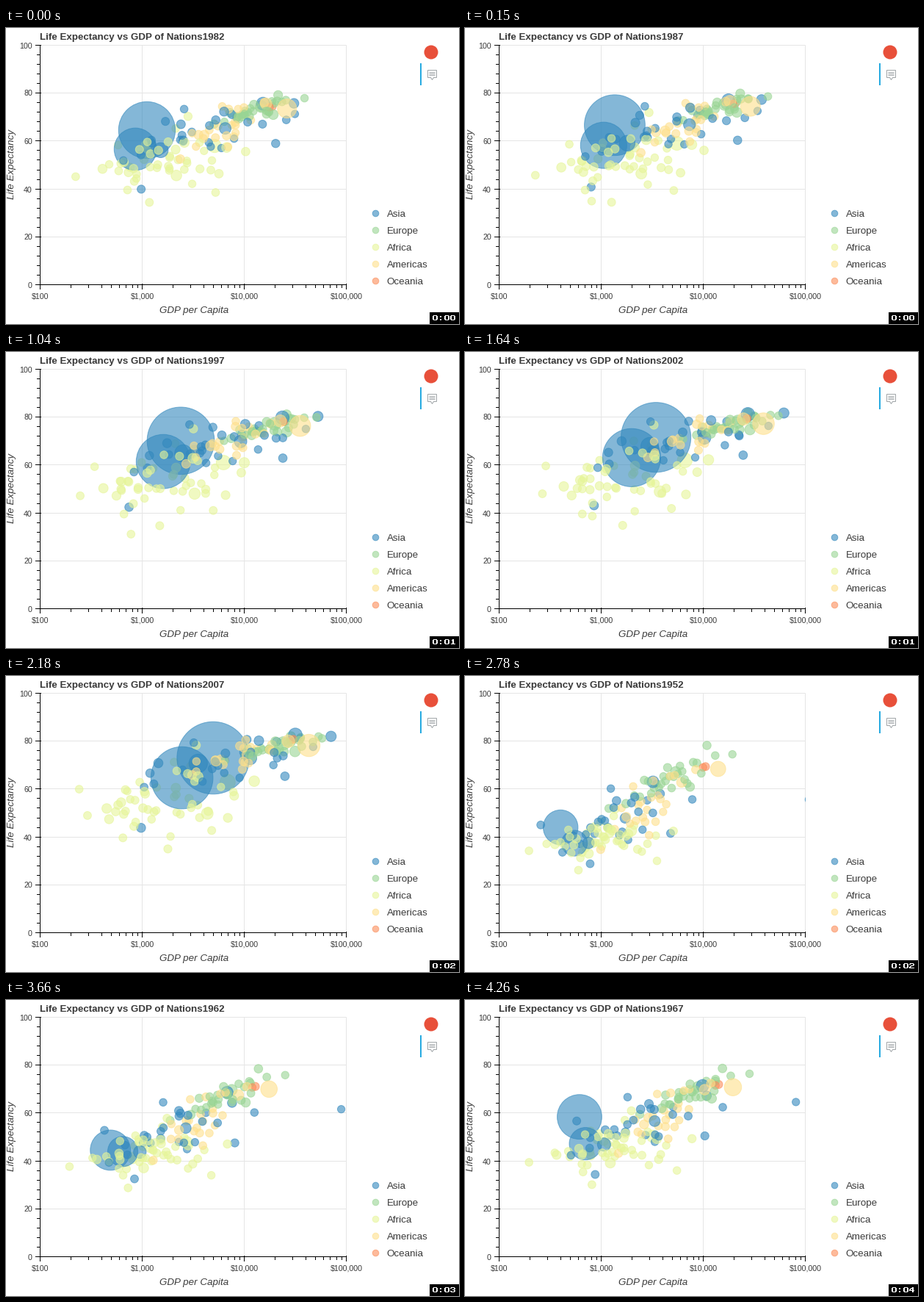
A matplotlib script that plays this animation: 617x403 px, repeating every 4360 ms.

```python
import numpy as np
import matplotlib.pyplot as plt
from matplotlib.animation import FuncAnimation
from matplotlib.collections import LineCollection, PolyCollection
from matplotlib.colors import to_rgba
from matplotlib.patches import Circle, Polygon, Rectangle

W, H, DPI = 617, 403, 100
STEP, LOOP = 20, 4360
LEFT, RIGHT, TOP, BOTTOM = 46.5, 463.5, 23.5, 349.5
INK, GRID, ICON = "#3a3a3a", "#e5e5e5", "#a1a6a9"
PX = 72 / DPI

REGIONS = {"Asia": "#3288bd", "Europe": "#99d594", "Africa": "#e6f598",
           "Americas": "#fee08b", "Oceania": "#fc8d59"}

# start time (ms) -> year on show
YEARS = {0: 1982, 150: 1987, 600: 1992, 1040: 1997, 1640: 2002, 2180: 2007,
         2780: 1952, 3220: 1957, 3660: 1962, 4260: 1967}
SECONDS = [900, 1930, 3070, 3960]
POINTER = (1780, 2030)

# Crowd trends at KEYS: nations, tie of life to income,
# then log10 income and its spread, life expectancy and its spread
KEYS = (1952, 1982, 2007)
TRENDS = {
    "Asia": (27, 0.65, (3.15, 3.64, 3.85), (0.34, 0.46, 0.5), (47, 64, 71.5), (8.5, 7, 6.5)),
    "Europe": (30, 0.85, (3.68, 4.12, 4.33), (0.27, 0.22, 0.26), (64.4, 72.8, 77.6), (6, 3.2, 3)),
    "Africa": (50, 0.45, (3.0, 3.2, 3.22), (0.28, 0.36, 0.42), (39.2, 51.8, 55), (5, 7.2, 9)),
    "Americas": (24, 0.75, (3.46, 3.81, 3.93), (0.22, 0.2, 0.24), (53, 66, 73.5), (9, 6.5, 4.2)),
    "Oceania": (2, 1, (4.01, 4.26, 4.47), (0.02, 0.05, 0.1), (69.2, 74.3, 80.7), (0.3, 0.6, 0.8)),
}

# Bubbles that stand out: region, drawing rank, then year: (income, life, millions)
LEADERS = [
    ("Asia", 0.15, {1952: (400, 44, 556), 1962: (488, 44.5, 666), 1967: (613, 58.4, 755),
                    1992: (1656, 68.7, 1165), 2007: (4959, 73, 1319)}),
    ("Asia", 0.4, {1952: (547, 37.4, 372), 1967: (701, 47.2, 506), 1982: (856, 56.6, 708),
                   2007: (2452, 64.7, 1110)}),
    ("Asia", 0.42, {1952: (750, 37.5, 82), 1982: (1517, 56.2, 153), 2007: (3541, 70.7, 224)}),
    ("Asia", 0.5, {1952: (3217, 63, 86), 1967: (9848, 71.4, 101), 2007: (31656, 82.6, 127)}),
    ("Asia", 0.52, {1952: (108382, 55.6, 0), 1967: (80895, 64.6, 1), 1982: (31354, 71.3, 1),
                    2007: (47307, 77.6, 2)}),
    ("Asia", 0, {1952: (779, 28.8, 8), 1982: (978, 39.9, 13), 1992: (649, 41.7, 16),
                 2007: (975, 43.8, 32)}),
    ("Africa", 0.05, {1952: (3521, 30, 4), 1967: (5523, 36, 5), 2007: (4797, 42.7, 12)}),
    ("Africa", 0.75, {1952: (493, 40, 2), 1982: (882, 46.2, 5), 1992: (737, 23.6, 7),
                      2007: (863, 46.2, 9)}),
    ("Americas", 0.95, {1952: (13990, 68.4, 158), 1967: (19530, 70.8, 199),
                        2007: (42952, 78.2, 301)}),
]

rng = np.random.default_rng(12)


def px(log_income):
    return LEFT + 139 * (log_income - 2)


def py(life):
    return BOTTOM - 3.26 * np.asarray(life)


def radius(millions):
    return 5.1 + 0.0335 * millions


def spread(n):
    """Evenly filled bell curve in random order."""
    q = (np.arange(n) + 0.5) / n
    return rng.permutation(0.55 * np.log(q / (1 - q)))


TRAITS = {name: [spread(trend[0]) for _ in range(4)] for name, trend in TRENDS.items()}


def crowd(name, year):
    """Each nation keeps its traits; its rank in wealth drifts slowly."""
    tie, *trend = TRENDS[name][1:]
    income, income_sd, life, life_sd = (np.interp(year, KEYS, v) for v in trend)
    birth, later, health, size = TRAITS[name]
    turn = 0.9 * (year - 1952) / 55
    wealth = np.cos(turn) * birth + np.sin(turn) * later
    vigour = tie * wealth + np.sqrt(1 - tie ** 2) * health
    people = 6 * np.exp(size) * (1 + (year - 1952) / 50)
    return np.column_stack([px(income + income_sd * wealth),
                            py(np.minimum(life + life_sd * vigour, 82)), radius(people)])


def leader(path, year):
    income, life, people = np.array(list(path.values())).T
    at = [np.interp(year, list(path), v) for v in (np.log10(income), life, people)]
    return px(at[0]), py(at[1]), radius(at[2])


owners = [name for name in TRENDS for _ in range(TRENDS[name][0])] + [v[0] for v in LEADERS]
ranks = np.append(rng.random(len(owners) - len(LEADERS)), [v[1] for v in LEADERS])
ORDER = np.argsort(ranks)


def chart(year):
    parts = [crowd(name, year) for name in TRENDS]
    parts.append(np.array([leader(path, year) for _, _, path in LEADERS]))
    return np.vstack(parts)[ORDER]


CHARTS = {year: chart(year) for year in YEARS.values()}

fig = plt.figure(figsize=(W / DPI, H / DPI), dpi=DPI, facecolor="white")
ax = fig.add_axes([0, 0, 1, 1])
ax.set(xlim=(0, W), ylim=(H, 0))
ax.set_autoscale_on(False)
ax.axis("off")


def lines(segments, color, z, width=1):
    ax.add_collection(LineCollection(segments, colors=color, linewidths=width * PX, zorder=z,
                                     snap=False), autolim=False)


def label(x, y, text, size=13.33, **kw):
    return ax.text(x, y, text, fontsize=size * PX, family="Liberation Sans", color=INK,
                   va="baseline", **kw)


def hline(x0, x1, y):
    return [(x0, y), (x1, y)]


def vline(x, y0, y1):
    return [(x, y0), (x, y1)]


def pixel(v):
    return np.floor(v + 1e-6) + 0.5


# Grid, axes and ticks
rows = [pixel(py(v)) for v in range(0, 101, 20)]
cols = [LEFT + 139 * k for k in range(4)]
lines([hline(LEFT, RIGHT, y) for y in rows] + [vline(x, TOP, BOTTOM) for x in cols], GRID, 1)
small_y = [pixel(py(v)) for v in range(0, 101, 4)]
small_x = [pixel(px(d + np.log10(m))) for d in (2, 3, 4) for m in range(1, 10)]
lines([vline(LEFT, TOP - 0.5, BOTTOM + 0.5), hline(LEFT, RIGHT + 0.5, BOTTOM)]
      + [hline(40, 48, y) for y in rows] + [vline(x, 348, 356) for x in cols]
      + [hline(42, 46, y) for y in small_y] + [vline(x, 350, 354) for x in small_x], "black", 4)
for k, y in enumerate(rows):
    label(36, y + 4, str(20 * k), 10.67, ha="right")
for k, x in enumerate(cols):
    label(x, 369, f"${10 ** (k + 2):,}", 10.67, ha="center")
label(256, 388, "GDP per Capita", style="italic", ha="center")
label(11, 185, "Life Expectancy", style="italic", ha="center", rotation=90,
      rotation_mode="anchor")
title = label(46.5, 16, "", weight="bold")

# Bubbles
fill = [to_rgba(REGIONS[owners[k]], 0.6) for k in ORDER]
dots = ax.scatter(*CHARTS[1982][:, :2].T, s=100, c=fill, edgecolors=fill, linewidths=PX, zorder=3)
dots.set_clip_path(Rectangle((46, 23), 418, 327, transform=ax.transData))

# Legend
for k, (name, color) in enumerate(REGIONS.items()):
    shade = to_rgba(color, 0.6)
    ax.add_patch(Circle((503.5, 252.5 + 23 * k), 4.3, fc=shade, ec=shade, lw=PX))
    label(518.5, 257 + 23 * k, name)

# Toolbar
ax.add_patch(Circle((579, 33), 9.5, color="#e8503a", lw=0))
ax.add_patch(Rectangle((564, 48), 2, 30, color="#26aae1", lw=0))
ax.add_patch(Polygon([(574.5, 57.5), (586.5, 57.5), (586.5, 67.5), (582.5, 67.5), (580.5, 70.5),
                      (578.5, 67.5), (574.5, 67.5)], fc="white", ec=ICON, lw=PX, snap=False))
lines([hline(576.5, 584.5, y) for y in (60.5, 62.5, 64.5)], ICON, 2)

# Clock: digits built from small bars (x, y, width, height)
ENDS = [(1, 0, 5, 1), (0, 1, 2, 1)]
GLYPHS = {
    "0": ENDS + [(1, 6, 5, 1), (0, 2, 2, 4), (5, 1, 2, 5)],
    "1": [(3, 0, 2, 6), (2, 1, 1, 1), (1, 6, 6, 1)],
    "2": ENDS + [(5, 1, 2, 2), (2, 3, 4, 1), (1, 4, 2, 1), (0, 5, 2, 1), (0, 6, 7, 1)],
    "3": ENDS + [(5, 1, 2, 2), (3, 3, 3, 1), (5, 4, 2, 2), (0, 5, 2, 1), (1, 6, 5, 1)],
    "4": [(4, 0, 2, 7), (2, 1, 2, 1), (1, 2, 2, 1), (0, 3, 2, 1), (0, 4, 7, 1)],
    ":": [(2, 1, 2, 2), (2, 5, 2, 2)],
}


def clock_bars(text):
    bars = []
    for k, ch in enumerate(text):
        for x, y, w, h in GLYPHS[ch]:
            x, y = x + 581 + 8 * k, y + 391
            bars.append([(x, y), (x + w, y), (x + w, y + h), (x, y + h)])
    return bars


ax.add_patch(Rectangle((577, 387), 40, 16, color="black", lw=0, zorder=5))
clock = PolyCollection(clock_bars("0:00"), facecolors="white", linewidths=0, zorder=6)
ax.add_collection(clock, autolim=False)

ARROW = [(0, 0), (0, 14.5), (3.3, 11.4), (5.6, 16.4), (8, 15.4), (5.8, 10.5), (10.4, 10.5)]
pointer = ax.add_patch(Polygon([(60 + x, 360.7 + y) for x, y in ARROW], fc="black", ec="white",
                               lw=PX, zorder=7, visible=False))


def draw(i):
    t = i * STEP + STEP / 2
    year = YEARS[max(s for s in YEARS if s <= t)]
    data = CHARTS[year]
    dots.set_offsets(data[:, :2])
    dots.set_sizes((2 * data[:, 2] * PX) ** 2)
    title.set_text(f"Life Expectancy vs GDP of Nations{year}")
    clock.set_verts(clock_bars(f"0:0{sum(t >= s for s in SECONDS)}"))
    pointer.set_visible(POINTER[0] <= t < POINTER[1])
    return dots, title, clock, pointer


anim = FuncAnimation(fig, draw, frames=LOOP // STEP, interval=STEP, repeat=True)
plt.show()
```
